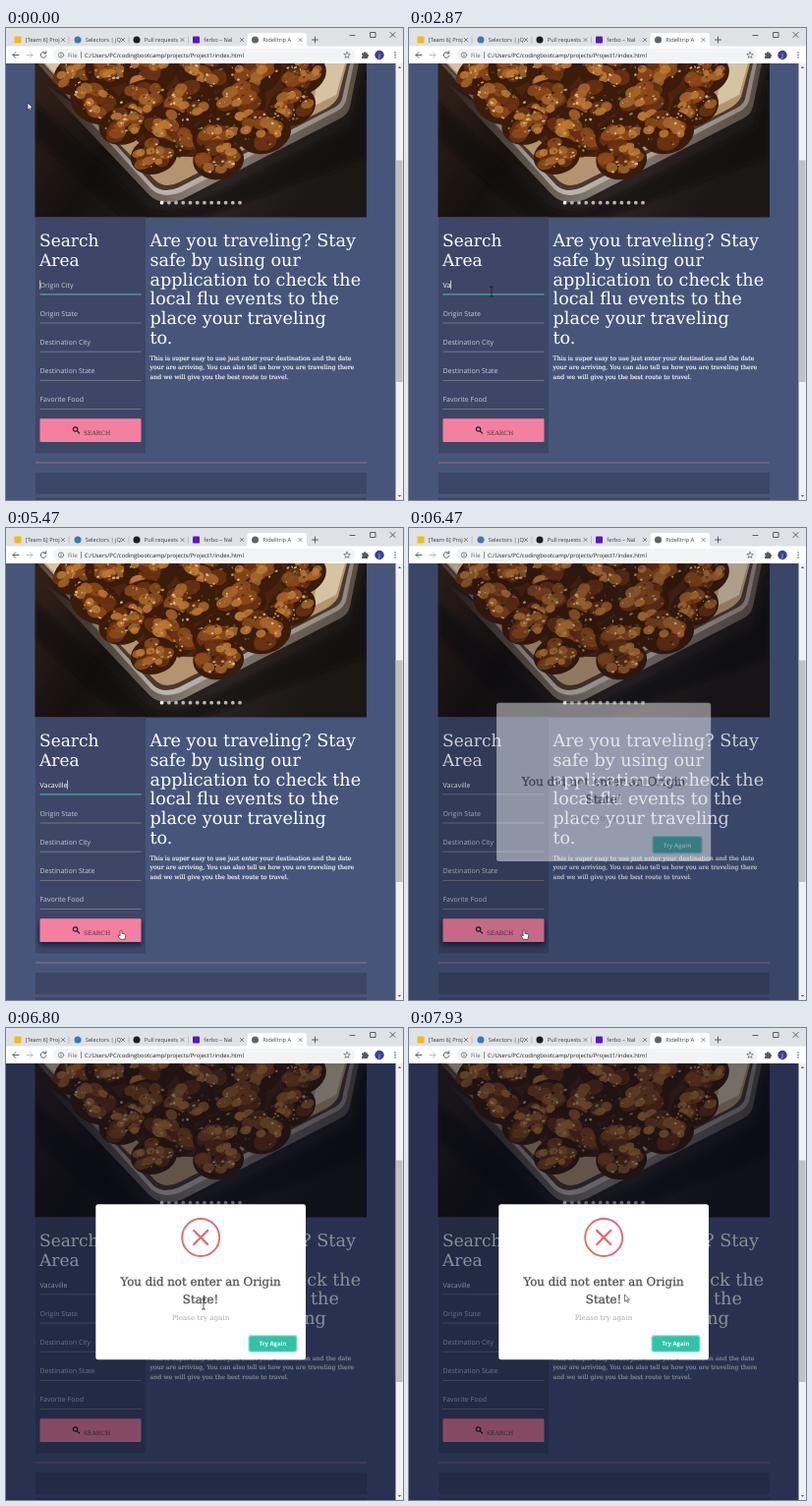
An HTML page that plays this animation: 404x480 px, repeating every 8 s.

```html
<!DOCTYPE html>
<html lang="en">
<head>
<meta charset="utf-8">
<title>Travel search</title>
<style>
html, body { margin: 0; width: 100%; height: 100%; overflow: hidden; background: #47557b; }
svg { display: block; width: 404px; height: 480px; text-rendering: geometricPrecision; }
.sans { font-family: "Open Sans", "Noto Sans", sans-serif; }
.slab { font-family: "DejaVu Serif", serif; }
.line { fill: none; stroke-linecap: round; stroke-linejoin: round; }
</style>
</head>
<body>
<svg viewBox="0 0 404 480">
  <defs>
    <clipPath id="photoClip"><rect x="29.500" y="36" width="337.500" height="156.400"/></clipPath>
    <linearGradient id="table" x1="0" y1="0" x2="1" y2="0.3">
      <stop offset="0" stop-color="#35221a"/><stop offset="0.35" stop-color="#15100e"/>
      <stop offset="0.75" stop-color="#2a2422"/><stop offset="1" stop-color="#1b1715"/>
    </linearGradient>
    <linearGradient id="rim" x1="0" y1="0" x2="1" y2="0">
      <stop offset="0" stop-color="#55483f"/><stop offset="0.4" stop-color="#bdb6ad"/><stop offset="1" stop-color="#8f867e"/>
    </linearGradient>
    <linearGradient id="wall" x1="0" y1="0" x2="1" y2="0">
      <stop offset="0" stop-color="#2c211b"/><stop offset="0.5" stop-color="#8a7f75"/><stop offset="1" stop-color="#564c45"/>
    </linearGradient>
    <filter id="soft" x="-30%" y="-50%" width="160%" height="220%"><feGaussianBlur stdDeviation="2"/></filter>
    <filter id="blend"><feGaussianBlur stdDeviation="0.6"/></filter>
  </defs>

  <rect width="404" height="480" fill="#47557b"/>
  <g id="photo" clip-path="url(#photoClip)">
    <rect x="29" y="36" width="338" height="157" fill="url(#table)"/>
    <path d="M30 76L142 182Q160 192 184 184L352 100L367 36V130L200 193H120L30 112Z" fill="#0c0807" opacity="0.55" filter="url(#soft)"/>
    <path d="M38 56L146 170Q158 182 180 174L340 92Q348 88 350 80L359 36H330L160 140Z" fill="url(#wall)"/>
    <path d="M32 36L148 164Q160 174 178 167L338 84Q344 80 346 74L354 36Z" fill="url(#rim)"/>
    <path d="M36 36L150 160Q160 169 176 162L334 81Q340 78 342 72L350 36Z" fill="#4a382c"/>
    <path d="M38 36H74L116 106L176 132L282 84L322 36H347L338 70Q334 78 324 83L176 157Q162 164 152 155L86 88Z" fill="#b3946f"/>
    <path d="M40 36H66L80 66L74 72ZM320 36H345L336 68L312 80Z" fill="#d6c3a3"/>
    <g id="food" filter="url(#blend)"/>
  </g>
  <g id="dots"/>

  <rect x="30" y="192.400" width="112" height="240" fill="#3d4666"/>
  <g id="headings" class="slab" fill="#fff"></g>
  <g id="fields" class="sans" font-size="7"></g>
  <rect id="focus" x="34.500" y="270.400" width="103" height="1" fill="#3da5a6"/>
  <text id="typed" class="sans" x="34.500" y="263.700" font-size="7" fill="#fff"></text>
  <rect id="caret" y="256.500" width="0.700" height="9" fill="#fff"/>

  <rect id="shadow" x="34" y="400" width="104" height="24" fill="#10162a" filter="url(#soft)"/>
  <rect x="34.500" y="397.300" width="103" height="23.700" rx="0.800" fill="#f4809f"/>
  <g class="line" stroke="#1f2130" stroke-width="1.200"><circle cx="70.600" cy="408" r="2.200"/><path d="M72.400 409.800L74.600 412"/></g>
  <text class="slab" x="79" y="414" font-size="6" fill="#4a3345">SEARCH</text>
  <rect x="30" y="441.600" width="337" height="0.800" fill="#b06f97"/>
  <path d="M30 452H367V474H30ZM30 477.500H367V480H30Z" fill="#3d4666"/>

  <rect id="shade" y="36" width="397" height="444" fill="#040a1e"/>
  <g id="modal">
    <rect x="91.300" y="179.300" width="213.700" height="158" rx="2.500" fill="#fff"/>
    <g id="ring" class="line" stroke="#e06b74" stroke-width="1.900">
      <circle r="19"/><path id="cross" d="M-7 -7L7 7M7 -7L-7 7" stroke-width="2.400"/>
    </g>
    <g class="slab" text-anchor="middle">
      <g font-size="11.800" fill="#4b4b4f" stroke="#4b4b4f" stroke-width="0.250">
        <text x="198" y="262">You did not enter an Origin</text><text x="198" y="279.500">State!</text>
      </g>
      <text x="198" y="297.300" font-size="7.200" fill="#a9a9ad">Please try again</text>
    </g>
    <rect x="246.300" y="312" width="50.400" height="18" rx="2.500" fill="#a9e6da"/>
    <rect x="247.500" y="313.200" width="48" height="15.600" rx="1.800" fill="#2fc3a6"/>
    <text class="sans" x="271.500" y="323.400" font-size="6" font-weight="700" text-anchor="middle" fill="#fff">Try Again</text>
  </g>

  <g id="chrome" class="sans" font-size="6" fill="#3c4043">
    <rect width="404" height="19" fill="#dee1e6"/>
    <rect y="18.500" width="404" height="17.500" fill="#fff"/>
    <path d="M243 19Q245.500 18.500 245.500 16V8Q245.500 5 248.500 5H303Q306 5 306 8V16Q306 18.500 308.500 19Z" fill="#fff"/>
    <g id="tabs" font-size="5.700"></g>
    <g class="line" stroke="#4a4d51" stroke-width="0.900">
      <path d="M311.500 12H317.500M314.500 9V15M350 7.500H355M371 4.500H376V9.500H371ZM391 4.500L396 9.500M396 4.500L391 9.500"/>
      <path d="M13 27.500H7M9.700 24.800L7 27.500L9.700 30.200M40.400 25.600A2.900 2.900 0 1 0 41 28.200M40.800 23.700V25.900H38.600"/>
      <path d="M21 27.500H27M24.300 24.800L27 27.500L24.300 30.200" stroke="#b5b8bc"/>
    </g>
    <rect x="48" y="20.800" width="307" height="13.200" rx="6.600" fill="#f1f3f4"/>
    <g class="line" stroke="#5f6368" stroke-width="0.700">
      <circle cx="56" cy="27.500" r="2.700"/><path d="M56 27.200V28.800M56 25.900V26M76.500 24.500V30.500"/>
      <path d="M347 24.200L347.900 26.400L350.300 26.600L348.500 28.200L349 30.500L347 29.300L345 30.500L345.500 28.200L343.700 26.600L346.100 26.400Z"/>
    </g>
    <text x="63" y="29.700" fill="#5f6368">File</text>
    <text x="80" y="29.700" font-size="5.930" fill="#202124">C:/Users/PC/codingbootcamp/projects/Project1/index.html</text>
    <path d="M362 25.500H364A1.200 1.200 0 0 1 366.400 25.500H368V27A1.200 1.200 0 0 1 368 29.400V31H362V29.200A1.200 1.200 0 0 0 362 27Z" fill="#55595e"/>
    <circle cx="380" cy="27.500" r="4.700" fill="#3f3d9c"/>
    <text x="380" y="29.500" font-size="5.500" text-anchor="middle" fill="#fff">J</text>
    <g fill="#55595e"><circle cx="396" cy="25" r="0.800"/><circle cx="396" cy="27.500" r="0.800"/><circle cx="396" cy="30" r="0.800"/></g>
    <rect x="396.500" y="36" width="7.500" height="444" fill="#f1f1f1"/>
    <rect x="397" y="134.500" width="6.500" height="225.500" fill="#c1c1c1"/>
    <path d="M398.800 41L400.500 39L402.200 41ZM398.800 475L400.500 477L402.200 475Z" fill="#606060"/>
  </g>

  <g id="pointer">
    <path id="arrow" d="M0 0V7.200L1.700 5.700L2.800 8.200L3.900 7.700L2.800 5.300H5.100Z" fill="#fff" stroke="#15171f" stroke-width="0.550"/>
    <path id="beam" class="line" d="M-1.600 -5H-0.400L0 -4.600L0.400 -5H1.600M0 -4.600V4.600M-1.600 5H-0.400L0 4.600L0.400 5H1.600" stroke="#11141c" stroke-width="0.700"/>
    <path id="hand" d="M-0.900 0.500Q0 -0.700 0.900 0.500V3.300L4 4Q4.900 4.300 4.700 5.500L4 9.300H-0.500L-2.900 5.800Q-3 4.600 -1.900 5L-0.900 6Z" fill="#fff" stroke="#15171f" stroke-width="0.600"/>
  </g>
</svg>

<script>
const LOOP = 8000, BLINK = 532;
const $ = id => document.getElementById(id);
const set = (id, name, value) => $(id).setAttribute(name, value);
const clamp = v => Math.max(0, Math.min(1, v));
const smooth = v => v * v * (3 - 2 * v);
const span = (t, start, length) => clamp((t - start) / length);
const text = (x, y, str, attrs = "") => `<text x="${x}" y="${y}" ${attrs}>${str}</text>`;

let seed = 17;
const rand = () => (seed = seed * 16807 % 2147483647) / 2147483647;

// One piece of food: a dark base, rough lumps lit from above, then crumbs and herbs.
function foodPiece([x, y, r]) {
  const lumps = ["#6b3313", "#8d4a1a", "#a8662a", "#bd7a35"];
  const crumbs = ["#d9b57c", "#c08a45", "#4f240d", "#ead3a0", "#5d7a2e", "#7a3d17"];
  const blot = (spread, rx, ry, fill, opacity) => {
    const a = rand() * 6.283, d = Math.sqrt(rand()) * spread * r;
    return `<ellipse cx="${d * Math.cos(a)}" cy="${d * 0.75 * Math.sin(a)}" rx="${rx}" ry="${ry}" fill="${fill}" opacity="${opacity}"/>`;
  };
  let out = `<g transform="translate(${x} ${y}) rotate(${rand() * 60 - 30})">` +
    `<ellipse cy="2" rx="${r}" ry="${r * 0.78}" fill="#3b1b0a"/>`;
  for (let i = 0; i < 14; i++) {
    const size = r * (0.36 - i * 0.015);
    out += blot(0.7, size * (0.8 + rand() * 0.5), size * 0.8, lumps[Math.floor(i / 3.6)], 0.85);
  }
  for (let i = 0; i < 24; i++) out += blot(0.85, 0.6 + rand() * 1.4, 0.6 + rand() * 0.8, crumbs[i % 6], 0.8);
  return out + "</g>";
}

function drawFood() {
  const pieces = [[70, 46, 24], [104, 40, 24], [146, 42, 28], [200, 42, 28], [252, 44, 29], [302, 46, 24],
    [92, 74, 27], [140, 72, 27], [186, 74, 28], [236, 76, 29], [290, 78, 25], [118, 98, 24],
    [168, 104, 30], [216, 108, 27], [262, 104, 28], [150, 128, 24], [216, 132, 26]];
  $("food").innerHTML = '<path d="M62 36H318L306 80L220 132L150 130L84 70Z" fill="#4a2410"/>' +
    pieces.map(foodPiece).join("");
}

function drawPage() {
  $("dots").innerHTML = Array.from({ length: 12 }, (_, i) =>
    `<circle cx="${158.6 + i * 7.22}" cy="177.700" r="1.900" fill="${i ? "#b9b4b0" : "#fff"}"/>`).join("");

  const title = ["Are you traveling? Stay", "safe by using our", "application to check the",
    "local flu events to the", "place your traveling", "to."];
  const intro = ["This is super easy to use just enter your destination and the date",
    "your are arriving, You can also tell us how you are traveling there",
    "and we will give you the best route to travel."];
  $("headings").innerHTML =
    ["Search", "Area"].map((s, i) => text(34, 222.3 + i * 19.8, s, 'font-size="17"')).join("") +
    title.map((s, i) => text(146.5, 222.3 + i * 19.7, s, 'font-size="17.600"')).join("") +
    intro.map((s, i) => text(146.5, 338 + i * 9.3, s, 'font-size="6.220" stroke="#fff" stroke-width="0.120"')).join("");

  const labels = ["Origin City", "Origin State", "Destination City", "Destination State", "Favorite Food"];
  $("fields").innerHTML = labels.map((s, i) =>
    text(34.5, 263.7 + i * 29.15, s, `fill="#c9ccd5" ${i ? "" : 'id="hint"'}`) +
    `<rect x="34.500" y="${270.5 + i * 29.15}" width="103" height="0.700" fill="#8c8b90"/>`).join("");

  const tabs = [[12, "#f5ba15", "[Team 6] Proj", 58, 1], [73, "#3a78b4", "Selectors | jQ", 119, 0],
    [133, "#1b1f23", "Pull requests", 179.5, 0], [193.5, "#5b13c9", "ferbo – Nal", 240, 1],
    [253.5, "#5f6368", "Ridelltrip A", 299.5, 0]];
  $("tabs").innerHTML = tabs.map(([x, color, name, end, square], i) =>
    `<rect x="${x - 3.5}" y="8.500" width="7" height="7" rx="${square ? 1 : 3.5}" fill="${color}"/>` +
    text(x + 7.8, 14, name) +
    `<path class="line" d="M${end - 1.6} 10.400l3.200 3.200m0 -3.200l-3.200 3.200" stroke="#55595e" stroke-width="0.700"/>` +
    (i < 3 ? `<path d="M${end + 6} 8.500v7" stroke="#a5a9af" stroke-width="0.600"/>` : "")).join("");
}

const keys = [[2670, "V"], [2800, "Va"], [2935, "Vac"], [3000, "Vaca"], [3068, "Vacav"], [3870, "Vaca"], [3935, "Vac"],
  [4000, "Vaca"], [4065, "Vacavi"], [4135, "Vacavill"], [4206, "Vacaville"]];

const path = [[70, 22, 76], [600, 121, 314], [800, 121, 314], [1130, 111, 305], [1600, 84, 268], [4230, 84, 268],
  [4670, 212, 270], [4730, 212, 270], [5400, 117, 409], [6500, 117, 409], [6790, 201, 281],
  [7200, 201, 281], [7900, 219.5, 271]];

function track(t) {
  const i = path.findIndex(p => p[0] > t);
  if (i === 0) return path[0].slice(1);
  if (i < 0) return path[path.length - 1].slice(1);
  const [t0, x0, y0] = path[i - 1], [t1, x1, y1] = path[i];
  const k = smooth((t - t0) / (t1 - t0));
  return [x0 + (x1 - x0) * k, y0 + (y1 - y0) * k];
}

function pointerKind(t, x, y) {
  const within = (l, top, r, b) => x >= l && x <= r && y >= top && y <= b;
  if (t > 6500) {
    return within(117, 252, 279, 266) || within(179, 266, 217, 284) ? "beam" : "arrow";
  }
  if (within(34, 397, 138, 421)) return "hand";
  if (within(34, 250, 138, 388) && (y - 250) % 29.15 < 21.5) return "beam";
  return within(147, 207, 360, 325) ? "beam" : "arrow";
}

function popScale(p) {
  const stops = [[0, 0.7], [0.45, 1.05], [0.8, 0.95], [1, 1]];
  const i = Math.max(1, stops.findIndex(s => s[0] >= p));
  const [p0, s0] = stops[i - 1], [p1, s1] = stops[i];
  return s0 + (s1 - s0) * smooth((p - p0) / (p1 - p0));
}

function drawField(t) {
  const key = keys.filter(k => k[0] <= t).pop();
  set("hint", "visibility", key ? "hidden" : "visible");
  $("typed").textContent = key ? key[1] : "";
  const blinkStart = key ? key[0] : -262;
  const on = t < 6330 && Math.floor((t - blinkStart) / BLINK) % 2 === 0;
  set("caret", "x", 34.4 + (key ? $("typed").getComputedTextLength() : 0));
  set("caret", "visibility", on ? "visible" : "hidden");
  set("focus", "opacity", 1 - span(t, 6330, 130));
}

function drawModal(t) {
  const start = 6360;
  set("shade", "opacity", 0.46 * smooth(span(t, start, 250)));
  set("modal", "opacity", smooth(span(t, start, 235)));
  set("modal", "transform", `translate(198 258) scale(${popScale(span(t, start, 300))}) translate(-198 -258)`);
  const turn = smooth(span(t, start + 70, 340));
  set("ring", "opacity", span(t, start + 120, 250));
  set("ring", "transform", `translate(198.200 213) scale(1 ${Math.cos((1 - turn) * 1.57)})`);
  const mark = span(t, start + 190, 230);
  set("cross", "opacity", clamp(mark * 2));
  set("cross", "transform", `scale(${mark < 0.6 ? 0.4 + 0.75 * mark / 0.6 : 1.15 - 0.15 * (mark - 0.6) / 0.4})`);
}

function render(t) {
  drawField(t);
  drawModal(t);
  set("shadow", "opacity", 0.75 * span(t, 5270, 180) * (1 - span(t, 6520, 200)));
  const [x, y] = track(t), kind = pointerKind(t, x, y);
  set("pointer", "transform", `translate(${x} ${y})`);
  for (const id of ["arrow", "beam", "hand"]) set(id, "visibility", id === kind ? "visible" : "hidden");
}

drawFood();
drawPage();
const begin = performance.now();
function tick() {
  render((performance.now() - begin) % LOOP);
  requestAnimationFrame(tick);
}
tick();
</script>
</body>
</html>
```
